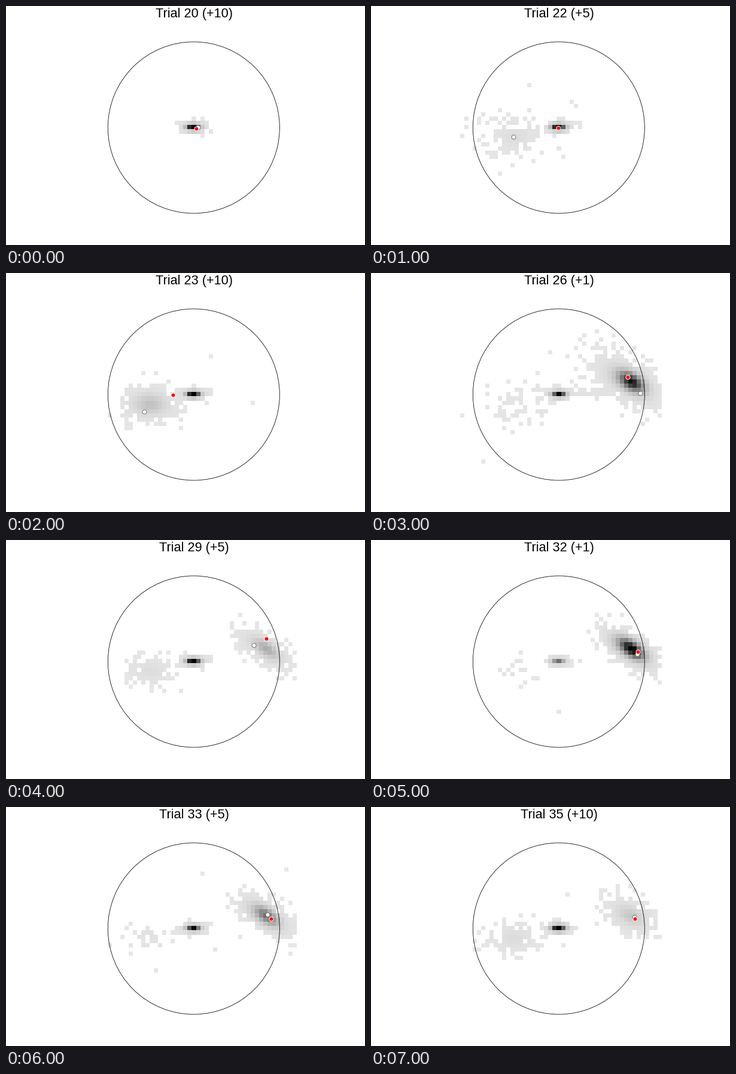
A matplotlib script for the animation above (8 s loop, 600x400 px).

```python
import numpy as np
import matplotlib.pyplot as plt
from matplotlib.animation import FuncAnimation
from matplotlib.patches import Circle

W, H, DPI = 600, 400, 100
PX = 72 / DPI                    # points per pixel
CX, CY, RADIUS = 313.8, 203.5, 143.5
HALF = 24                        # cells on each side of the middle one
FULL = 100                       # hits that turn a cell black
GRID = (142, 486, CY + 171.7, CY - 171.7)

COLS, ROWS = np.meshgrid(np.arange(-HALF, HALF + 1), np.arange(-HALF, HALF + 1))
scenes = []


def blob(cx, cy, sx, sy, peak, tilt=0):
    """Expected hits per cell of a tilted Gaussian."""
    dx, dy = (COLS - cx) / sx, (ROWS - cy) / sy
    dist = (dx * dx - 2 * tilt * dx * dy + dy * dy) / (1 - tilt * tilt)
    return peak * np.exp(-dist / 2)


def middle(strength=1.0, shift=-0.15):
    """The sharp central peak, its soft rim and a thin haze over the disc."""
    return (blob(shift, 0, 0.88, 0.42, 110 * strength)
            + blob(0, 0, 1.7, 0.7, 14 * strength)
            + blob(0, 0, 9, 7, 0.006))


def right(core, body, rim, tilt=0.6):
    """The cluster at the disc's edge, in three widening layers."""
    return (blob(17.3, -2.9, 1.7, 1.4, core, tilt)
            + blob(17, -2.9, 2.8, 2.1, body, tilt)
            + blob(16.8, -3.1, 3.7, 2.9, rim, tilt))


def left(core, rim, spread=1.0):
    return (blob(-10.4, 2.4, 2.4, 1.5, core)
            + blob(-10.6, 2.3, 3.8 * spread, 2.2 * spread, rim))


def add(trial, points, white, red, hits):
    """A cell shows once it is hit at least once, darker with more hits."""
    rng = np.random.default_rng(trial)
    lit = rng.random(hits.shape) < 1 - np.exp(-hits)
    gray = np.where(lit, 0.9 * (1 - np.minimum(hits / FULL, 1)), 1)
    scenes.append((f"Trial {trial} (+{points})", white, red, gray))


add(20, 10, (321, 203), (317.5, 205), middle())
add(22, 5, (238, 219), (313, 204), middle() + left(3, 1, 1.3))
add(23, 10, (230.5, 231.5), (279, 204), middle() + left(11, 5))
add(26, 1, (450, 201), (428.5, 173.5),
    middle(0.85, 0) + right(65, 25, 3, 0.5) + left(0, 0.45, 1.4)
    + blob(14, -5, 5, 4.2, 1.2, 0.3) + blob(7, -0.6, 3.5, 0.7, 1.5))
add(29, 5, (414, 175.5), (435, 165),
    middle(1.03) + right(15, 9, 2, 0.65) + left(3, 1, 0.9))
add(32, 1, (444.5, 190.5), (446, 187.2),
    middle(0.42) + right(75, 30, 2) + left(0.2, 0.5, 0.7))
add(33, 5, (437, 180), (443, 187),
    middle(0.8) + right(35, 15, 2) + left(1, 0.6, 0.8))
add(35, 10, (440, 183.5), (440.5, 186.5),
    middle() + right(7, 6, 1, 0.4) + left(3, 1.3, 1.1))


fig = plt.figure(figsize=(W / DPI, H / DPI), dpi=DPI, facecolor="white")
ax = fig.add_axes([0, 0, 1, 1])
ax.axis("off")
cells = ax.imshow(scenes[0][3], cmap="gray", vmin=0, vmax=1, extent=GRID,
                  interpolation="nearest", aspect="auto")
ax.set_xlim(0, W)
ax.set_ylim(H, 0)
ax.add_patch(Circle((CX, CY), RADIUS, fill=False, ec="black",
                    lw=0.8 * PX, zorder=2))
title = ax.text(314, 19, "", ha="center", va="baseline",
                family="Liberation Sans", size=21.6 * PX)


def dot(fill, edge, width, order):
    return ax.plot([], [], "o", ms=7 * PX, mfc=fill, mec=edge,
                   mew=width * PX, zorder=order)[0]


white_dot = dot("white", "0.4", 0.9, 3)
red_dot = dot("red", "white", 1, 4)


def draw(i):
    label, white, red, gray = scenes[i]
    title.set_text(label)
    cells.set_data(gray)
    white_dot.set_data([white[0]], [white[1]])
    red_dot.set_data([red[0]], [red[1]])
    return cells, title, white_dot, red_dot


anim = FuncAnimation(fig, draw, frames=len(scenes), interval=1000, repeat=True)
plt.show()
```
